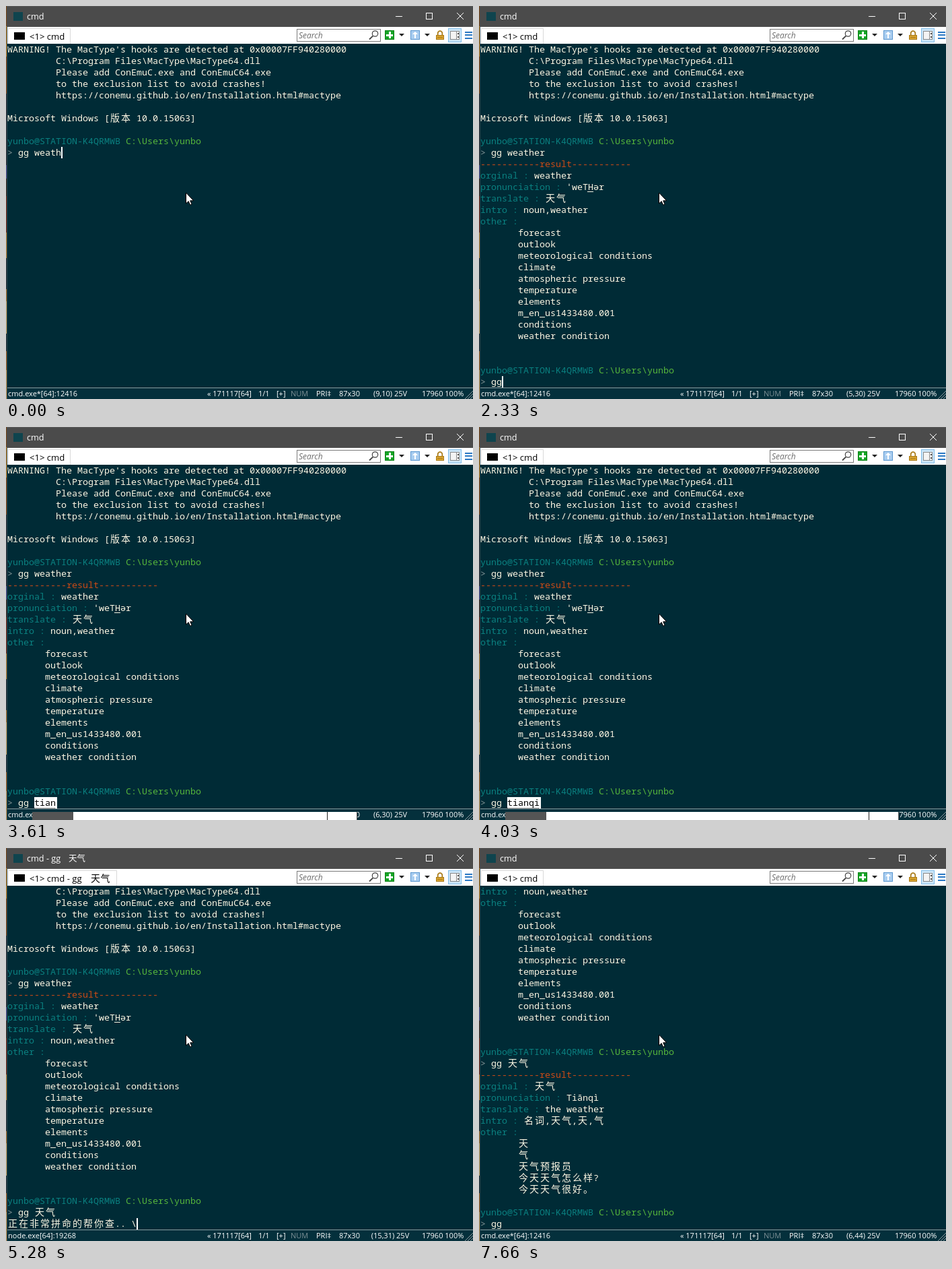
An HTML page with a canvas that plays this animation: 694 px wide and 583 px high, repeating every 8000 ms.

```html
<!DOCTYPE html>
<html lang="en">
<head>
<meta charset="utf-8">
<title>Terminal</title>
<style>
html, body { margin: 0; width: 100%; height: 100%; overflow: hidden; background: #002b36; }
canvas { display: block; }
</style>
</head>
<body>
<canvas id="stage" width="694" height="583"></canvas>
<script>
const ctx = document.getElementById('stage').getContext('2d');
const LOOP = 8000, CELL = 8, ROW = 17, LEFT = 2, TOP = 56;
const MONO = '13.333px "Noto Sans Mono", "DejaVu Sans Mono", monospace';
const CJK = '"Noto Sans CJK SC", "Noto Sans CJK", sans-serif';
const UI = '"Open Sans", "Noto Sans", sans-serif';
const BG = '#002b36', TEXT = '#fdf6e3', TEAL = '#0a8080', GREEN = '#55b53c', RED = '#cb4b16', DIM = '#839496';

// Transcript: each line is a list of [colour, text] runs
const plain = s => [[TEXT, s]];
const label = (name, s = '') => [[TEAL, name + ' : '], [TEXT, s]];
const item = s => plain(' '.repeat(7) + s);
const command = s => [[DIM, '>'], [TEXT, s.slice(1)]];
const prompt = [[TEAL, 'yunbo@STATION-K4QRMWB '], [GREEN, 'C:\\Users\\yunbo']];
const dashes = '-'.repeat(11);
const result = [[RED, dashes + 'result' + dashes]];
const note = s => plain(' '.repeat(9) + s);

const lines = [
  plain("WARNING! The MacType's hooks are detected at 0x00007FF940280000"),
  note('C:\\Program Files\\MacType\\MacType64.dll'),
  note('Please add ConEmuC.exe and ConEmuC64.exe'),
  note('to the exclusion list to avoid crashes!'),
  note('https://conemu.github.io/en/Installation.html#mactype'),
  [],
  plain('Microsoft Windows [版本 10.0.15063]'),
  [],
  prompt,
  command('> gg weather'),
  result,
  label('orginal', 'weather'),
  label('pronunciation', 'ˈweTHər'),
  label('translate', '天气'),
  label('intro', 'noun,weather'),
  label('other'),
  ...['forecast', 'outlook', 'meteorological conditions', 'climate', 'atmospheric pressure',
    'temperature', 'elements', 'm_en_us1433480.001', 'conditions', 'weather condition'].map(item),
  [], [],
  prompt,
  command('> gg 天气'),
  result,
  label('orginal', '天气'),
  label('pronunciation', 'Tiānqì'),
  label('translate', 'the weather'),
  label('intro', '名词,天气,天,气'),
  label('other'),
  ...['天', '气', '天气预报员', '今天天气怎么样?', '今天天气很好。'].map(item),
  [],
  prompt
];

// Timeline: done = finished lines, live = line being written
const SHELL = 'cmd.exe*[64]:12416', BUSY = '正在非常拼命的帮你查.. ';
const start = { done: 9, live: '> gg weath', title: 'cmd', han: '', icon: true, proc: SHELL,
  pos: '(9,10)', caret: true, ime: '', bar: 0 };
const steps = [
  [120, { live: '> gg weathe', pos: '(11,10)' }],
  [270, { live: '> gg weather', pos: '(13,10)' }],
  [550, { done: 10, live: '', title: 'gg  weather', icon: false }],
  [700, { icon: true, proc: 'node.exe[64]:1156', pos: '(1,11)' }],
  [880, { live: BUSY + '|' }],
  [1070, { live: BUSY + '/', pos: '(15,11)' }],
  [1350, { live: BUSY + '-' }],
  [1500, { done: 29, live: '> ', title: 'cmd' }],
  [1820, { proc: SHELL, pos: '(3,30)' }],
  [2090, { live: '> g' }],
  [2210, { live: '> gg', pos: '(4,30)' }],
  [2330, { pos: '(5,30)' }],
  [2600, { live: '> gg ' }],
  [3160, { ime: 't', bar: 430, pos: '(6,30)' }],
  [3310, { ime: 'ti', bar: 470 }],
  [3460, { ime: 'tia', bar: 500 }],
  [3610, { ime: 'tian', bar: 522 }],
  [3760, { ime: 'tianq', bar: 580 }],
  [3910, { ime: 'tianqi', bar: 624 }],
  [4050, { ime: '', live: '> gg 天气' }],
  [4180, { pos: '(8,30)' }],
  [4300, { done: 30, live: '', title: 'cmd - gg', han: '天气', icon: false }],
  [4420, { icon: true }],
  [4700, { proc: 'node.exe[64]:19268', pos: '(1,31)' }],
  [4860, { live: BUSY + '/' }],
  [5130, { live: BUSY + '-', pos: '(15,31)' }],
  [5280, { live: BUSY + '\\' }],
  [5410, { done: 43, live: '> ', title: 'cmd', han: '' }],
  [5720, { proc: SHELL, pos: '(3,44)' }],
  [6020, { caret: false }],
  [6450, { caret: true }],
  [6730, { live: '> g' }],
  [6930, { live: '> gg', pos: '(4,44)' }],
  [7130, { live: '> gg ', pos: '(5,44)' }],
  [7510, { caret: false }],
  [7660, { pos: '(6,44)' }]
];
const stateAt = t => Object.assign({}, start, ...steps.filter(s => s[0] <= t).map(s => s[1]));

function box(x, y, w, h, color) {
  ctx.fillStyle = color;
  ctx.fillRect(x, y, w, h);
}
function frame(x, y, w, h, color) {
  ctx.strokeStyle = color;
  ctx.lineWidth = 1;
  ctx.strokeRect(x + .5, y + .5, w - 1, h - 1);
}
function path(points, color, width = 1) {
  ctx.beginPath();
  points.forEach(([x, y]) => ctx.lineTo(x, y));
  ctx.strokeStyle = color;
  ctx.lineWidth = width;
  ctx.stroke();
}
function fillPath(points, color) {
  ctx.beginPath();
  points.forEach(([x, y]) => ctx.lineTo(x, y));
  ctx.closePath();
  ctx.fillStyle = color;
  ctx.fill();
}
function label2d(s, x, y, size, color, style = '') {
  ctx.font = `${style} ${size}px ${UI}`;
  ctx.fillStyle = color;
  ctx.fillText(s, x, y);
  return x + ctx.measureText(s).width;
}
function han(s, x, y, size, step, color) {
  ctx.font = `${size}px ${CJK}`;
  ctx.fillStyle = color;
  [...s].forEach((c, i) => ctx.fillText(c, x + i * step, y));
}

// Writes text on the character grid and returns the next x
function write(s, x, top, color) {
  for (const c of s) {
    const wide = /[\u3000-\u9fff]/.test(c);
    ctx.font = wide ? `300 14px ${CJK}` : MONO;
    ctx.fillStyle = color;
    ctx.fillText(c, x + (wide ? 1 : 0), top + 13);
    x += wide ? 2 * CELL : CELL;
  }
  return x;
}
const writeRuns = (runs, top) => runs.reduce((x, [color, s]) => write(s, x, top, color), LEFT);

function drawTitle(s) {
  box(0, 0, 694, 31, '#4b4b4b');
  box(0, 0, 694, 1, '#5a5a5a');
  box(11, 9, 14, 13, '#0f444e');
  label2d(s.title, 31, 20, 12.7, '#fff');
  han(s.han, 93, 20, 12.5, 12.5, '#fff');
  box(579, 15, 10, 1, '#fff');
  frame(624, 10, 10, 10, '#fff');
  path([[670, 10], [680, 20]], '#fff');
  path([[680, 10], [670, 20]], '#fff');
}

function drawTabs(s) {
  box(0, 31, 694, 25, '#fff');
  let end = label2d('<1> ' + s.title, 35, 50, 13.1, '#000');
  if (s.han) {
    han(s.han, 126, 50, 14, 14.5, '#000');
    end = 156;
  }
  const right = Math.round(end + 8) + .5;
  path([[3.5, 56], [3.5, 33.5], [right, 33.5], [right, 56]], '#d9d9d9');
  if (s.icon) box(12, 39, 16, 11, '#000');
}

function drawTools() {
  box(432, 34, 125, 19, '#fff');
  frame(432, 34, 125, 19, '#7a7a7a');
  label2d('Search', 435, 48, 12, '#6d6d6d', 'italic');
  ctx.beginPath();
  ctx.arc(548.5, 41, 4.2, 0, 7);
  ctx.strokeStyle = '#444';
  ctx.lineWidth = 1.2;
  ctx.stroke();
  path([[545.3, 44.3], [540, 49.5]], '#444', 1.8);

  box(563, 36, 14, 14, '#16a526');
  frame(563, 36, 14, 14, '#0b8318');
  box(569, 38, 3, 10, '#fff');
  box(565, 42, 10, 3, '#fff');
  for (const x of [584, 622]) fillPath([[x, 41], [x + 8, 41], [x + 4, 45]], '#222');

  box(601, 36, 14, 14, '#a9cdf0');
  frame(601, 36, 14, 14, '#5b97cf');
  fillPath([[608, 38], [612, 42], [609, 42], [609, 48], [607, 48], [607, 42], [604, 42]], '#fff');

  ctx.beginPath();
  ctx.arc(645, 40.5, 3.3, Math.PI, 0);
  ctx.lineTo(648.3, 44);
  ctx.moveTo(641.7, 40.5);
  ctx.lineTo(641.7, 44);
  ctx.strokeStyle = '#a87915';
  ctx.lineWidth = 1.7;
  ctx.stroke();
  box(639, 43, 12, 7, '#d9a431');
  frame(639, 43, 12, 7, '#a87915');
  box(641, 46, 8, 1, '#a87915');

  box(657, 33, 20, 21, '#cce6f8');
  frame(657, 33, 20, 21, '#7fbce8');
  box(660, 37, 14, 13, '#f4f4f4');
  frame(660, 37, 14, 13, '#8a8a8a');
  box(669, 38, 1, 11, '#8a8a8a');
  box(671, 40, 2, 2, '#555');
  box(671, 45, 2, 2, '#555');
  for (const y of [38, 42, 47]) box(682, y, 11, 2, '#2a78c4');
}

function drawConsole(s) {
  box(0, TOP, 694, 583 - TOP, BG);
  const scroll = Math.max(0, s.done - 29);
  const topOf = i => TOP + ROW * (i - scroll);
  for (let i = scroll; i < s.done; i++) writeRuns(lines[i], topOf(i));
  if (scroll <= 12 && s.done > 12) box(161, topOf(12) + 15, 9, 1, TEXT);

  const top = topOf(s.done);
  const runs = s.live[0] === '>' ? command(s.live) : plain(s.live);
  const x = writeRuns(runs, top);
  if (s.ime) {
    const w = s.ime.length * CELL;
    box(x, top, w + 2, ROW, '#fff');
    write(s.ime, x, top, '#000');
    for (let i = 0; i < w; i += 2) box(x + i, top + 16, 1, 1, '#000');
  } else if (s.caret) {
    box(x, top, 2, ROW, '#fff');
  }
}

function drawStatus(s) {
  box(0, 567, 694, 16, '#04303c');
  box(2, 566, 692, 1, '#8a9a9e');
  const put = (t, x, c = '#fff') => label2d(t, x, 579, 11, c);
  put(s.proc, 3);
  put('« 171117[64]', 299);
  put('1/1', 375);
  put('[+]', 402);
  put('NUM', 423, '#7d8f95');
  put('PRI‡', 461);
  put('87x30', 495);
  ctx.textAlign = 'center';
  put(s.pos + ' 25V', 571);
  ctx.textAlign = 'left';
  put('17960 100%', 618);
  for (const d of [3, 7, 11]) path([[693 - d, 583], [694, 582 - d]], '#8a9a9e');
  if (s.ime) {
    box(39, 571, s.bar - 39, 12, '#fff');
    box(39, 571, 61, 12, '#555');
    box(s.bar - 45, 571, 1, 12, '#222');
    box(s.bar - 1, 571, 1, 12, '#555');
  }
}

function drawEdge() {
  const bands = [[0, '#7a4a1c'], [30, '#c98a2c'], [75, '#8a4a1a'], [130, '#2a2f3a'], [236, '#4a4f9a'],
    [256, '#3a2a24'], [282, '#7a2a1c'], [336, '#c08a3c'], [374, '#24303a'], [420, '#b07a34'],
    [438, '#d0b070'], [486, '#20303c'], [512, '#a8682a'], [540, '#c8a060']];
  bands.forEach(([y, c], i) => box(0, y, 1, (bands[i + 1] || [583])[0] - y, c));
  box(1, 31, 1, 552, '#30464c');
}

function drawPointer() {
  const tip = [[0, 0], [0, 16], [3.7, 12.6], [6.2, 18.2], [8.6, 17.2], [6.2, 11.8], [11.2, 11.8]]
    .map(([x, y]) => [267.5 + x, 277 + y]);
  fillPath(tip, '#fff');
  path([...tip, tip[0]], '#000');
}

function draw(now) {
  const s = stateAt((now - begin) % LOOP);
  drawConsole(s);
  drawStatus(s);
  drawTitle(s);
  drawTabs(s);
  drawTools();
  drawEdge();
  drawPointer();
}
const begin = performance.now();
function tick() {
  draw(performance.now());
  requestAnimationFrame(tick);
}
tick();
</script>
</body>
</html>
```
